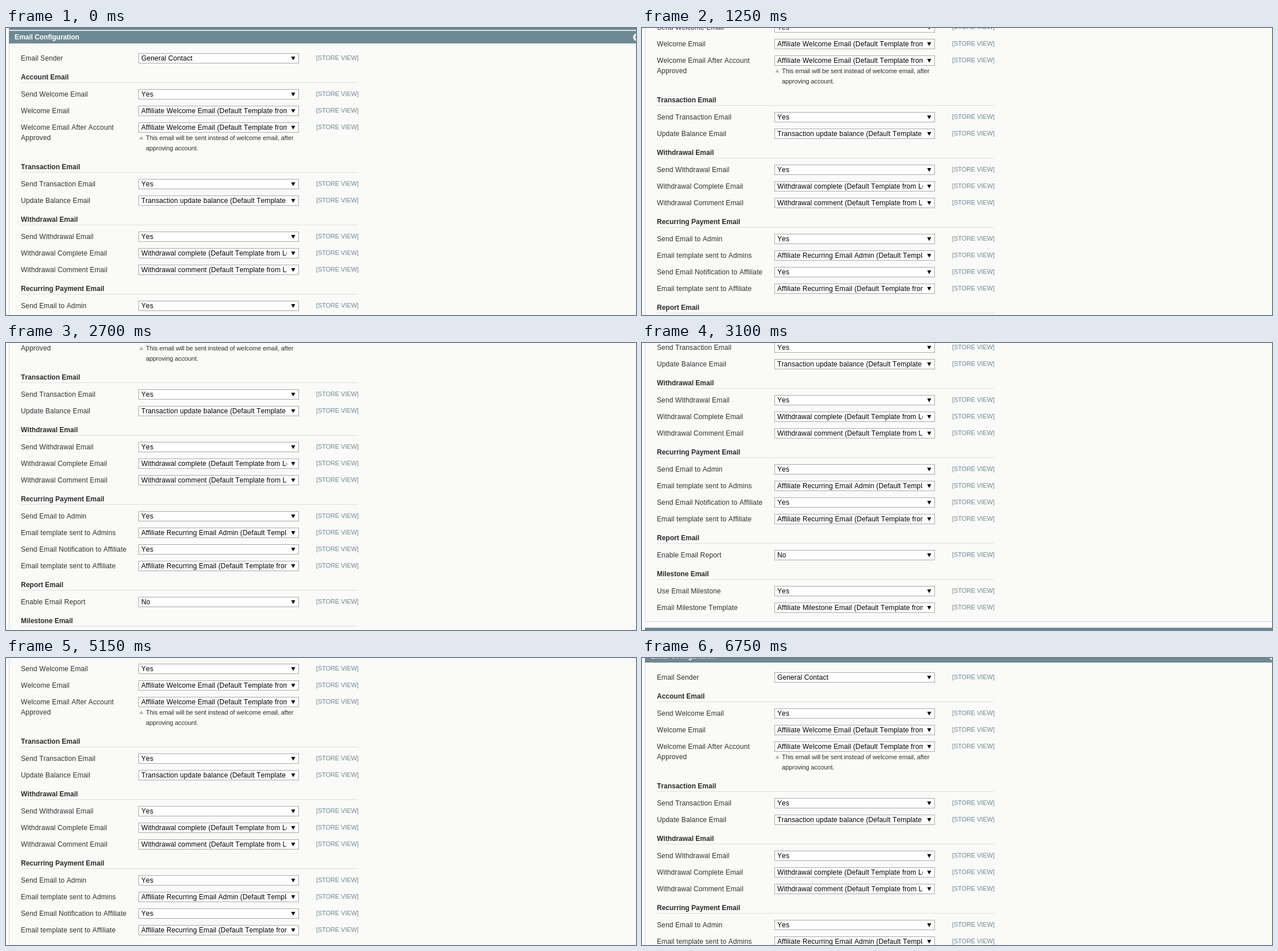
Write an HTML page that moves like this. It is 1099 px wide and 502 px high and loops after 7500 ms.

```html
<!DOCTYPE html>
<html lang="en">
<head>
<meta charset="utf-8">
<title>Email Configuration</title>
<style>
  html, body { margin: 0; width: 100%; height: 100%; overflow: hidden; background: #fff; }
  svg { display: block; }
  text { font: 12px "Liberation Sans", Arial, sans-serif; font-kerning: none; white-space: pre; }
  .label { fill: #303030; letter-spacing: .12px; }
  .value { fill: #000; letter-spacing: .12px; }
  .head { fill: #2a2a2a; font-weight: bold; }
  .title { fill: #fff; font-weight: bold; letter-spacing: -.06px; }
  .scope { fill: #6f8992; font-size: 11px; letter-spacing: -.1px; }
  .note { fill: #2f2f2f; font-size: 11px; letter-spacing: -.09px; }
</style>
</head>
<body>
<svg id="stage" width="1099" height="502" viewBox="0 0 1099 502">
  <g id="page"></g>
  <path id="cursor" d="M1017.5 29.5V45.5L1021.2 42L1023.6 47.5H1025.6L1026 46.5L1023.8 41.5H1028.5Z"
    fill="#fff" stroke="#000" visibility="hidden"/>
</svg>
<script>
const page = document.getElementById('page');
const cursor = document.getElementById('cursor');
const LOOP = 7500, STEP = 50;
const TEAL = '#6f8992';

const sections = [
  [null, ['Email Sender', 'General Contact']],
  ['Account Email',
    ['Send Welcome Email', 'Yes'],
    ['Welcome Email', 'Affiliate Welcome Email (Default Template from Locale)'],
    ['Welcome Email After Account', 'Affiliate Welcome Email (Default Template from Locale)', 'Approved',
      ['This email will be sent instead of welcome email, after', 'approving account.']]],
  ['Transaction Email',
    ['Send Transaction Email', 'Yes'],
    ['Update Balance Email', 'Transaction update balance (Default Template from Locale)']],
  ['Withdrawal Email',
    ['Send Withdrawal Email', 'Yes'],
    ['Withdrawal Complete Email', 'Withdrawal complete (Default Template from Locale)'],
    ['Withdrawal Comment Email', 'Withdrawal comment (Default Template from Locale)']],
  ['Recurring Payment Email',
    ['Send Email to Admin', 'Yes'],
    ['Email template sent to Admins', 'Affiliate Recurring Email Admin (Default Template from Locale)'],
    ['Send Email Notification to Affiliate', 'Yes'],
    ['Email template sent to Affiliate', 'Affiliate Recurring Email (Default Template from Locale)']],
  ['Report Email', ['Enable Email Report', 'No']],
  ['Milestone Email',
    ['Use Email Milestone', 'Yes'],
    ['Email Milestone Template', 'Affiliate Milestone Email (Default Template from Locale)']]
];

// Scroll moves: start time, number of steps, from, to, skew of the easing
const moves = [
  [900, 8, 0, 117, 1],
  [2450, 14, 117, 265, .91],
  [4650, 11, 265, 97, 1],
  [5900, 9, 97, 19, 1]
];

const rect = (x, y, w, h, fill) => `<rect x="${x}" y="${y}" width="${w}" height="${h}" fill="${fill}"/>`;
const text = (cls, x, y, str) => `<text class="${cls}" x="${x}" y="${y}">${str}</text>`;

function selectBox(y, value) {
  return `<rect x="231.5" y="${y - 12.5}" width="279" height="17" fill="#fff" stroke="#a9a9a9"/>
    <svg x="232" y="${y - 12}" width="258" height="16">${text('value', 4, 12, value)}</svg>
    <path d="M497.5 ${y - 7}h7l-3.5 6.5z"/>`;
}

function row(y, [label, value, more, note]) {
  let out = text('label', 26, y, label) + selectBox(y, value) + text('scope', 541, y - 1, '[STORE VIEW]');
  if (more) out += text('label', 26, y + 18, more);
  if (note) {
    out += `<path d="M232.5 ${y + 17}h7l-3.5-6z" fill="#aab8b1"/>`;
    note.forEach((line, i) => out += text('note', 244, y + 18 * (i + 1), line));
  }
  return out;
}

function build() {
  let out = rect(5, 0, 1094, 3.5, TEAL) + rect(5, 27, 1094, 726, '#d6d6d6') +
    rect(6, 27, 1093, 725, '#fafaf8') + rect(5, 5, 1094, 22, TEAL) +
    text('title', 15, 20, 'Email Configuration') +
    '<circle cx="1101" cy="16" r="7" fill="#f4f6f6"/><circle cx="1101" cy="16" r="4" fill="#a9b8bd"/>' +
    rect(5, 763, 1094, 22, TEAL);
  let y = 57;
  for (const [head, ...rows] of sections) {
    if (head) {
      out += text('head', 26, y, head) + rect(26, y + 5, 588, 1, '#dfdfdf');
      y += 30;
    }
    for (const r of rows) {
      out += row(y, r);
      y += r[3] ? 65 : 29;
    }
    y += 4;
  }
  page.innerHTML = out;
}

function scrollAt(t) {
  let pos = 0;
  for (const [start, steps, from, to, skew] of moves) {
    if (t < start) break;
    const u = Math.min(1, (Math.floor((t - start) / STEP) + 1) / steps) ** skew;
    pos = Math.round(from + (to - from) * u * u * (3 - 2 * u));
  }
  return pos;
}

function draw(t) {
  page.setAttribute('transform', `translate(0 ${-scrollAt(t)})`);
  cursor.setAttribute('visibility', t >= 6700 && t < 6750 ? 'visible' : 'hidden');
}

build();
const begin = performance.now();
function frame() {
  draw((performance.now() - begin) % LOOP);
  requestAnimationFrame(frame);
}
frame();
</script>
</body>
</html>
```
